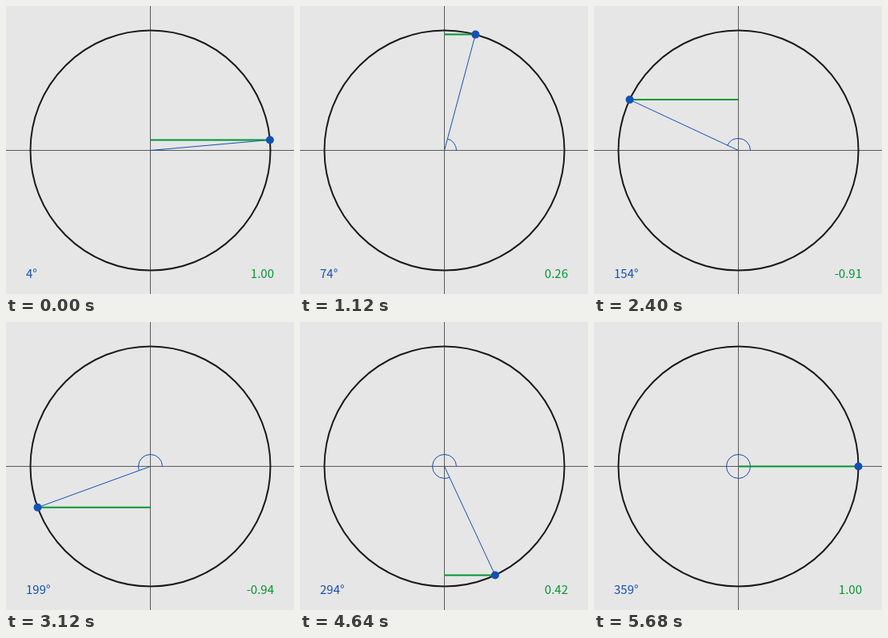
An HTML page with a canvas that plays this animation: 360x360 px, repeating every 5.76 s.

```html
<!DOCTYPE html>
<html lang="en">
<head>
<meta charset="utf-8">
<title>Cosine on the unit circle</title>
<style>
  html, body { margin: 0; height: 100%; overflow: hidden; background: #e6e6e6; }
  canvas { display: block; }
</style>
</head>
<body>
<canvas id="stage" width="360" height="360"></canvas>
<script>
const ctx = document.getElementById("stage").getContext("2d");
const STEP_MS = 80, STEPS = 72, CENTER = 180.5, RADIUS = 150;
const INK = "#1a1a1a", BLUE = "#1450b4", GREEN = "#009632";

function line(x1, y1, x2, y2, color, width) {
  ctx.beginPath();
  ctx.moveTo(x1, y1);
  ctx.lineTo(x2, y2);
  stroke(color, width);
}

function arc(radius, angle, color, width) {
  ctx.beginPath();
  ctx.arc(CENTER, CENTER, radius, 0, -angle, true);
  stroke(color, width);
}

function stroke(color, width) {
  ctx.strokeStyle = color;
  ctx.lineWidth = width;
  ctx.stroke();
}

function label(text, x, align, color) {
  ctx.fillStyle = color;
  ctx.textAlign = align;
  ctx.fillText(text, x, 340);
}

function draw(step) {
  // Just short of each multiple of 5°, so the floored label reads one less.
  const degrees = (step + 1) * 5 - 0.001;
  const angle = degrees * Math.PI / 180;
  const x = CENTER + RADIUS * Math.cos(angle);
  const y = CENTER - RADIUS * Math.sin(angle);

  ctx.fillStyle = "#e6e6e6";
  ctx.fillRect(0, 0, 360, 360);
  line(0, CENTER, 360, CENTER, "#5a5a5a", 1);
  line(CENTER, 0, CENTER, 360, "#5a5a5a", 1);
  arc(RADIUS, 2 * Math.PI, INK, 2);
  arc(15, angle, BLUE, 1);
  line(CENTER, CENTER, x, y, BLUE, 1);
  line(CENTER, y, x, y, GREEN, 2);

  ctx.fillStyle = BLUE;
  ctx.beginPath();
  ctx.arc(x, y, 5, 0, 2 * Math.PI);
  ctx.fill();

  ctx.font = '15px "Noto Sans CJK JP", "Noto Sans CJK SC", "Noto Sans CJK", sans-serif';
  label(Math.floor(degrees) + "°", 25, "left", BLUE);
  label(Math.cos(angle).toFixed(2), 335, "right", GREEN);
}

function tick() {
  draw(Math.floor(performance.now() / STEP_MS) % STEPS);
  requestAnimationFrame(tick);
}
tick();
</script>
</body>
</html>
```
